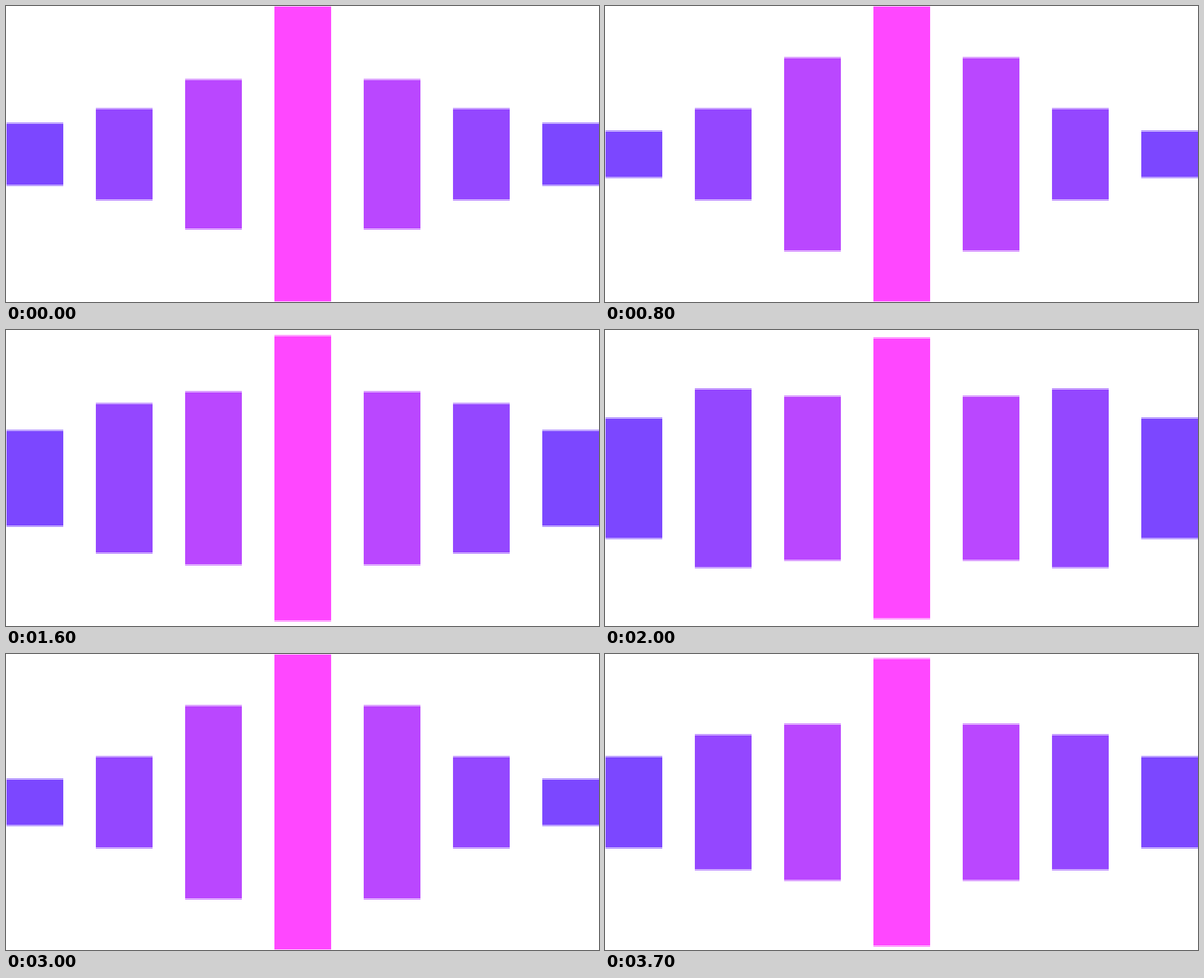
Recreate the animation shown at these times as an HTML page with a canvas. Size 1056 px wide and 528 px high, loop 3800 ms.

```html
<!DOCTYPE html>
<html lang="en">
<head>
<meta charset="utf-8">
<title>Sound bars</title>
<style>
html, body { margin: 0; width: 100%; height: 100%; overflow: hidden; background: #fff; }
canvas { display: block; }
</style>
</head>
<body>
<canvas id="stage" width="1056" height="528"></canvas>
<script>
const ctx = document.getElementById('stage').getContext('2d');
const STEP = 100, STEPS = 38;
const colors = ['#7c47ff', '#9447ff', '#ba47ff', '#ff47ff'];

// Levels from the outer bar to the middle one.
const rest = [4, 6, 10, 20];
const wide = [8, 12, 11, 19];
const peak = [3, 6, 13, 20];
const poses = [
  { at: 0, levels: rest },
  { at: 2, levels: wide },
  { at: 8, levels: peak },
  { at: 10, levels: rest }
];

function levelAt(bar, pos) {
  const i = Math.max(1, poses.findIndex(p => p.at >= pos));
  const a = poses[i - 1], b = poses[i];
  const part = (pos - a.at) / (b.at - a.at);
  return a.levels[bar] + (b.levels[bar] - a.levels[bar]) * part;
}

function drawBar(x, level, color) {
  const top = Math.max(1, Math.round(260.6 - 13.03 * level));
  const bottom = Math.min(527, 529 - top);
  ctx.fillStyle = color;
  ctx.fillRect(x, top, 101, bottom - top);
  if (top === 1) return;
  // A thin gap sets off the first and last pixel rows.
  ctx.clearRect(x, top + 1, 101, 1);
  ctx.clearRect(x, bottom - 2, 101, 1);
}

function draw(now) {
  const step = Math.floor(now / STEP) % STEPS;
  const run = Math.min(step, STEPS - step);   // plays forward, then back
  const pos = 10 - Math.abs(10 - run);        // each run swings out and returns
  ctx.clearRect(0, 0, 1056, 528);
  for (let i = 0; i < 7; i++) {
    const bar = 3 - Math.abs(3 - i);
    drawBar(1 + 159 * i, levelAt(bar, pos), colors[bar]);
  }
}

const start = performance.now();
function tick() {
  draw(performance.now() - start);
  requestAnimationFrame(tick);
}
tick();
</script>
</body>
</html>
```
